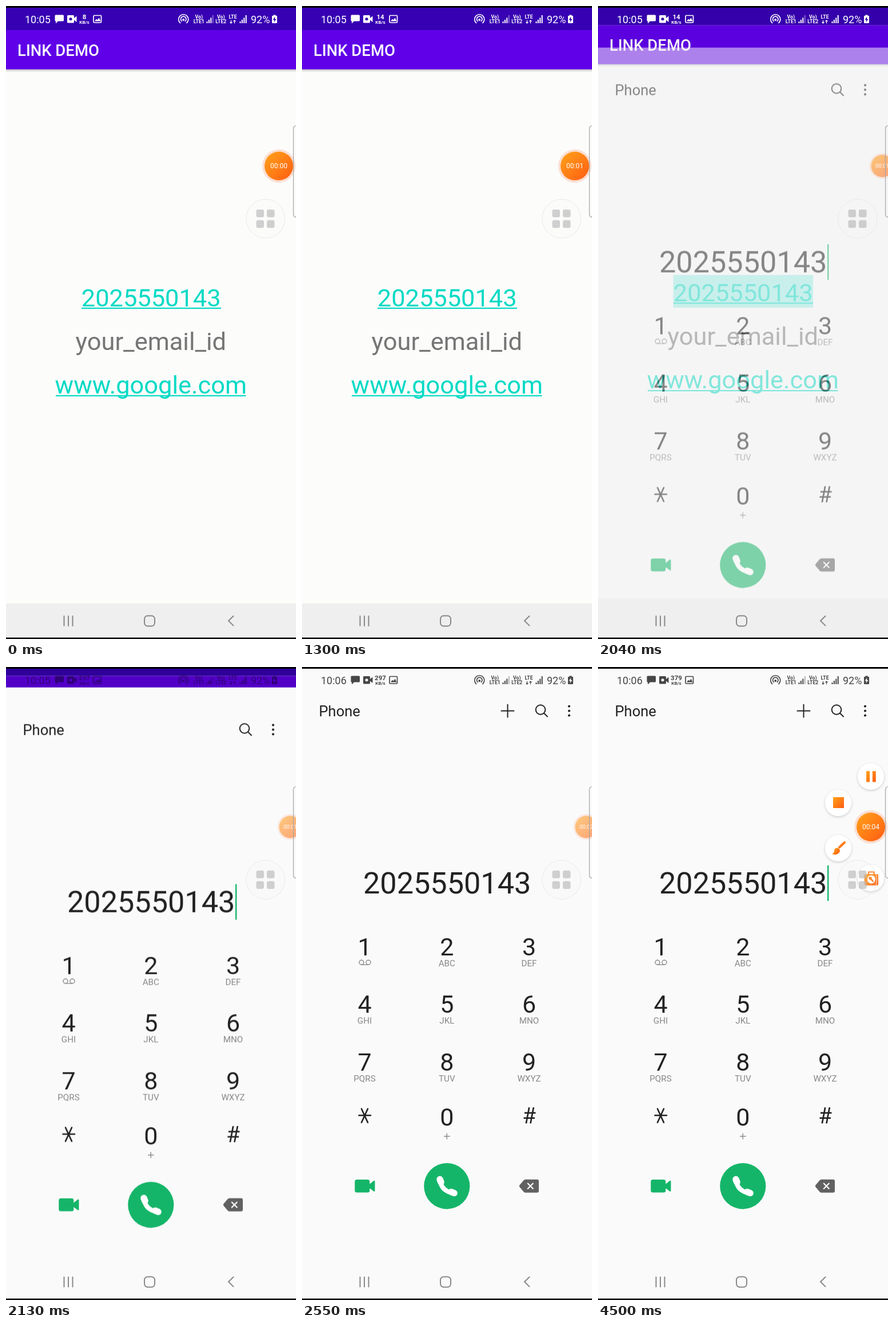
These frames come from a looping animation (507x1104 px, 4830 ms). An HTML page:

```html
<!DOCTYPE html>
<html lang="en">
<head>
<meta charset="utf-8">
<title>Tap to dial</title>
<style>
html, body { margin: 0; width: 100%; height: 100%; overflow: hidden; background: #000; }
svg { display: block; width: 100%; height: 100%; font-family: Roboto, "Noto Sans", sans-serif; }
.mid { text-anchor: middle; }
.line { fill: none; stroke-linecap: round; stroke-linejoin: round; }
.link { fill: #03dac5; font-size: 43.4px; }
.digit { font-size: 43px; fill: #222; }
.letters { font-size: 15.2px; fill: #888; }

.highlight, .cursor, .plus { animation: 4830ms step-end infinite; }
.highlight { animation-name: highlight; }
.cursor { animation-name: cursor; }
.plus { animation-name: plus; }
.status { animation: status 4830ms linear infinite; color: #fff; }
.home { animation: home 4830ms infinite; }
.dim { animation: dim 4830ms linear infinite; }
.phone { animation: rise 4830ms infinite, fade 4830ms linear infinite; }
.ball { animation: ball 4830ms linear infinite; }
.menu { animation: menu 4830ms infinite; }

@keyframes highlight { 0% { opacity: 0; } 32.7%, 100% { opacity: 1; } }
@keyframes cursor {
  0% { opacity: 1; } 52.6% { opacity: 0; } 63.1% { opacity: 1; }
  73.7% { opacity: 0; } 84.1%, 100% { opacity: 1; }
}
@keyframes plus { 0% { opacity: 0; } 50.2%, 100% { opacity: 1; } }
@keyframes status {
  0%, 42.5% { color: #fff; }
  43.5% { color: rgba(0, 0, 0, .25); }
  45.5%, 100% { color: rgba(0, 0, 0, .72); }
}
@keyframes home {
  0% { transform: translateY(0); }
  41.45% { transform: translateY(0); animation-timing-function: cubic-bezier(.25, .46, .45, .94); }
  48.65%, 100% { transform: translateY(-42px); }
}
@keyframes dim { 0%, 41.45% { opacity: 0; } 44%, 100% { opacity: .14; } }
@keyframes rise {
  0% { transform: translateY(88px); }
  41.45% { transform: translateY(88px); animation-timing-function: cubic-bezier(.25, .46, .45, .94); }
  48.65%, 100% { transform: translateY(0); }
}
@keyframes fade { 0%, 41.45% { opacity: 0; } 43%, 100% { opacity: 1; } }
@keyframes ball {
  0%, 29% { transform: translate(477px, 279px) scale(1); opacity: 1; }
  33.1% { opacity: .56; }
  36.4%, 72.9% { transform: translate(497px, 279px) scale(.78); opacity: .56; }
  76%, 100% { transform: translate(477px, 279px) scale(1); opacity: 1; }
}
@keyframes menu {
  0% { transform: translate(477px, 279px) scale(0); opacity: 0; }
  76.6% { transform: translate(477px, 279px) scale(0); opacity: 0; animation-timing-function: ease-out; }
  83.2%, 100% { transform: translate(477px, 279px) scale(1); opacity: 1; }
}
</style>
</head>
<body>
<svg viewBox="0 0 507 1104" preserveAspectRatio="none">
  <defs>
    <linearGradient id="orange" x1="0" y1="0" x2="1" y2="1">
      <stop offset="0" stop-color="#ffa31a"/><stop offset="1" stop-color="#ff5c12"/>
    </linearGradient>
    <linearGradient id="barShade" x2="0" y2="1">
      <stop offset="0" stop-color="#000" stop-opacity=".22"/><stop offset="1" stop-color="#000" stop-opacity="0"/>
    </linearGradient>
    <filter id="soft" x="-30%" y="-30%" width="160%" height="160%">
      <feDropShadow dx="0" dy="1.5" stdDeviation="2" flood-color="#000" flood-opacity=".2"/>
    </filter>
    <path id="bars" d="M0 27h2v3h-2zM3.4 24h2v6h-2zM6.8 20.5h2v9.5h-2z"/>
    <rect id="tile" width="13.5" height="13.5" rx="3"/>
  </defs>

  <!-- Link screen -->
  <rect width="507" height="1104" fill="#fcfcfb"/>
  <g class="home">
    <rect width="507" height="1160" fill="#fcfcfb"/>
    <rect width="507" height="42" fill="#3700b3"/>
    <rect y="42" width="507" height="68.5" fill="#5f00e8"/>
    <rect y="110.5" width="507" height="5" fill="url(#barShade)"/>
    <text x="20" y="87" font-size="27.5" font-weight="500" fill="#fff">LINK DEMO</text>
    <rect class="highlight" x="131.5" y="478" width="244.5" height="57" fill="#9aefe5"/>
    <text class="link mid number" x="253.7" y="524"></text>
    <rect x="132" y="526" width="244" height="2.2" fill="#03dac5"/>
    <text class="mid" x="253.3" y="600" font-size="43.4" fill="#757575">your_email_id</text>
    <text class="link mid" x="253.3" y="676">www.google.com</text>
    <rect x="87" y="678.6" width="332.5" height="2.2" fill="#03dac5"/>
    <rect y="1042" width="507" height="120" fill="#efefef"/>
    <rect class="dim" width="507" height="1160"/>
  </g>

  <!-- Dialler -->
  <g class="phone">
    <rect y="3" width="507" height="1110" fill="#fafafa"/>
    <text x="29.5" y="86" font-size="25.5" fill="#222">Phone</text>
    <path class="line plus" d="M348.5 76.5h22M359.5 65.5v22" stroke="#222" stroke-width="2"/>
    <g class="line" stroke="#222" stroke-width="2">
      <circle cx="417" cy="74.5" r="8.3"/><path d="M423 80.5l6 6"/>
    </g>
    <g fill="#222">
      <circle cx="467" cy="68.5" r="2.1"/><circle cx="467" cy="76.5" r="2.1"/><circle cx="467" cy="84.5" r="2.1"/>
    </g>
    <text class="mid number" x="253.7" y="395" font-size="52.2" fill="#222"></text>
    <rect class="cursor" x="401" y="346" width="2.4" height="62" fill="#16b56b"/>
    <g id="keys"></g>
    <g class="line" stroke="#888" stroke-width="1.4">
      <circle cx="104" cy="515.3" r="4"/><circle cx="116" cy="515.3" r="4"/>
      <path d="M104 519.4h12M248.5 818.5h9.5M253.2 813.7v9.5"/>
    </g>
    <path class="line" d="M99.5 782h20.5M104 770.5l11 24M115 770.5l-11 24" stroke="#222" stroke-width="2.6"/>
    <text class="mid" x="397" y="796" font-size="38.5" fill="#222">#</text>
    <circle cx="253.3" cy="905.3" r="40.1" fill="#15b569"/>
    <g class="line" stroke="#fff">
      <path d="M241 893Q243 915 266 917.5" stroke-width="8"/>
      <path d="M241 893.5l2 5M261 915.5l5 2" stroke-width="11.5"/>
    </g>
    <g fill="#15b569">
      <rect x="92.3" y="894" width="26" height="22.5" rx="3.5"/>
      <path d="M116 903.5L125.5 896Q127.5 895 127.5 897V913.5Q127.5 915.5 125.5 914.5L116 907.5z"/>
    </g>
    <path d="M380.5 903.5L387.5 895.3Q388.8 893.8 391 893.8H411Q414 893.8 414 896.8V913.7Q414 916.7 411 916.7H391Q388.8 916.7 387.5 915.2L380.5 907Q379 905.2 380.5 903.5z" fill="#616161"/>
    <path class="line" d="M394.8 900.8l9 9M403.8 900.8l-9 9" stroke="#fff" stroke-width="2.2"/>
  </g>

  <!-- Navigation -->
  <g class="line" stroke="#888" stroke-width="2">
    <path d="M101.5 1064v17M109 1064v17M116.5 1064v17M397.5 1064l-8.5 8.3 8.5 8.3"/>
    <rect x="242" y="1063.5" width="18" height="18" rx="5.5"/>
  </g>

  <!-- Status bar -->
  <g class="status" fill="currentColor">
    <text id="clock" x="33" y="29.5" font-size="18"></text>
    <path d="M87 15.5H99.5Q101 15.5 101 17V25Q101 26.5 99.5 26.5H91L87 30.5V26.5Q85.5 26.5 85.5 25V17Q85.5 15.5 87 15.5z"/>
    <path fill-rule="evenodd" d="M108.5 16H117.5Q119 16 119 17.5V21L123.5 17.5V28L119 24.5V28Q119 29.5 117.5 29.5H108.5Q107 29.5 107 28V17.5Q107 16 108.5 16zM110.5 22.7a2.5 2.5 0 1 0 5 0a2.5 2.5 0 1 0 -5 0z"/>
    <g class="mid" font-weight="700">
      <text id="rate" x="137" y="23" font-size="11.5"></text>
      <text x="137" y="30.8" font-size="8">KB/s</text>
      <g font-size="8.7">
        <text x="337.3" y="22">Vo)</text><text x="337.3" y="30">LTE1</text>
        <text x="375.8" y="22">Vo)</text><text x="375.8" y="30">LTE2</text>
        <text x="396.5" y="22">LTE</text>
      </g>
    </g>
    <path d="M155 26.5l3-4 2 2 2.5-4 3 6z"/>
    <g class="line" stroke="currentColor">
      <rect x="153" y="16.5" width="13.5" height="12.5" rx="1.5" stroke-width="1.7"/>
      <path d="M304.5 29.5A8.5 8.5 0 1 1 316 29.5M307 26.3A4.7 4.7 0 1 1 313.5 26.3" stroke-width="1.7"/>
      <path d="M393.5 25v5m-1.7-1.7l1.7 1.7 1.7-1.7M399.5 30v-5m-1.7 1.7l1.7-1.7 1.7 1.7" stroke-width="1.2"/>
    </g>
    <circle cx="310.2" cy="24" r="2"/>
    <use href="#bars" x="350.5"/>
    <path d="M360.7 16h2v14h-2z" opacity=".4"/>
    <use href="#bars" x="408.5"/>
    <path d="M418.7 16h2v14h-2z"/>
    <text x="428" y="29.5" font-size="18">92%</text>
    <path fill-rule="evenodd" d="M467.5 15.5H471.5V17H473Q474 17 474 18V29Q474 30 473 30H466Q465 30 465 29V18Q465 17 466 17H467.5zM470.3 18.5L466.5 24.3H469L468.5 28.5L472.5 22.7H470z"/>
  </g>
  <path d="M0 0h507v3h-507zM0 1101.5h507v2.5h-507z"/>

  <!-- Recorder menu -->
  <g class="menu">
    <g fill="#fff" filter="url(#soft)">
      <circle cy="-88" r="23"/><circle cx="-57" cy="-42" r="23"/>
      <circle cx="-57" cy="37" r="23"/><circle cy="89" r="23"/>
    </g>
    <g fill="url(#orange)">
      <path d="M-8 -97.5h6v19h-6zM2.8 -97.5h6v19h-6z"/>
      <rect x="-66" y="-52" width="19" height="19"/>
      <path d="M-68 47Q-64 45.5 -64 41.5A5 5 0 1 1 -55.5 45Q-60 50 -68 47z"/>
      <rect x="-11.5" y="82" width="24.5" height="20" rx="3"/>
    </g>
    <path class="line" d="M-55 35.5L-46 27" stroke="#ff7a18" stroke-width="4"/>
    <path class="line" d="M-4 82V78.500H5.500V82" stroke="#ff7a18" stroke-width="2.2"/>
    <circle cx=".8" cy="91.5" r="7" fill="#fff"/>
    <path class="line" d="M-.5 90l4 4.5" stroke="#ff7a18" stroke-width="2.8"/>
    <circle cx="-1" cy="89.5" r="2.7" fill="#ff7a18"/>
  </g>

  <!-- Floating buttons -->
  <circle cx="453.8" cy="371" r="34" fill="#f4f4f4" fill-opacity=".15" stroke="#e9e9e7"/>
  <g fill="#bbb" fill-opacity=".68">
    <use href="#tile" x="437.5" y="355"/><use href="#tile" x="456" y="355"/>
    <use href="#tile" x="437.5" y="373.5"/><use href="#tile" x="456" y="373.5"/>
  </g>
  <g class="ball">
    <circle r="29" fill="#ff6a30" fill-opacity=".2"/>
    <circle r="25" fill="url(#orange)"/>
    <text id="timer" class="mid" y="4.3" font-size="12" fill="#fff"></text>
  </g>
  <rect x="502.5" y="208.5" width="20" height="160" rx="5" fill="none" stroke="#a5a5a5" stroke-width="1.2"/>
</svg>
<script>
const LOOP = 4830;
const $ = id => document.getElementById(id);

document.querySelectorAll('.number').forEach(el => el.textContent = '2025550143');

const labels = ['', 'ABC', 'DEF', 'GHI', 'JKL', 'MNO', 'PQRS', 'TUV', 'WXYZ'];
const columns = [109.5, 253.3, 397];
const label = (cls, x, y, s) => `<text class="mid ${cls}" x="${x}" y="${y}">${s}</text>`;
$('keys').innerHTML = labels.map((s, i) => {
  const x = columns[i % 3], y = 503 + 100.4 * Math.floor(i / 3);
  return label('digit', x, y, i + 1) + label('letters', x, y + 18.8, s);
}).join('') + label('digit', columns[1], 799.5, 0);

// Each entry is a start time and the text shown from then on.
const tracks = {
  clock: [[0, '10:05'], [2400, '10:06']],
  rate: [[0, '8'], [1160, '14'], [2100, '297'], [3340, '66'], [4490, '379']],
  timer: [[0, '00:00'], [1160, '00:01'], [2160, '00:02'], [3160, '00:03'], [4160, '00:04']]
};

let start;
function draw(now) {
  start ??= now;
  const t = (now - start) % LOOP;
  for (const id in tracks) {
    const text = tracks[id].findLast(([from]) => t >= from)[1];
    if ($(id).textContent !== text) $(id).textContent = text;
  }
  requestAnimationFrame(draw);
}
requestAnimationFrame(draw);
</script>
</body>
</html>
```
